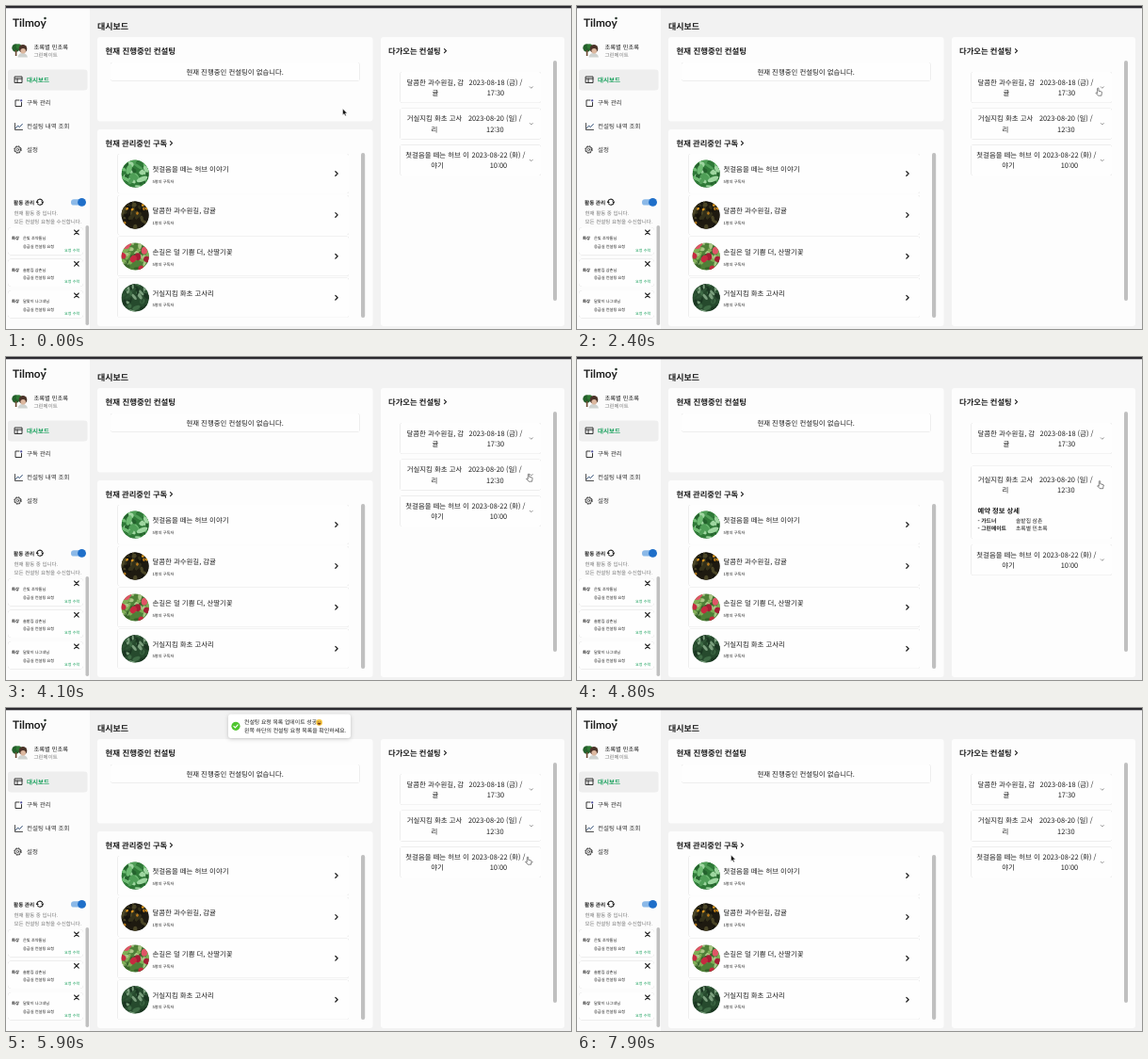
An HTML page that plays this animation: 600x343 px, repeating every 8 s.

```html
<!DOCTYPE html>
<html lang="ko">
<head>
<meta charset="utf-8">
<title>대시보드</title>
<style>
  html, body { margin: 0; width: 100%; height: 100%; overflow: hidden; background: #f2f2f2; }
  svg { display: block; font-family: "Noto Sans CJK KR", "Noto Sans KR", "Noto Sans CJK JP", "Noto Sans CJK", sans-serif; }
  #stage { width: 100vw; height: 100vh; text-rendering: geometricPrecision; }
  .card { fill: #fefefe; filter: drop-shadow(0 .9px .45px rgba(0, 0, 0, .24)); }
  .panel { fill: #fdfdfd; }
  .line { fill: none; stroke: #222; stroke-linecap: round; stroke-linejoin: round; }
  .bar { fill: #c0c0c0; }
  #toast .box { fill: #fff; filter: drop-shadow(0 1px 2px rgba(0, 0, 0, .2)); }
</style>
</head>
<body>
<svg id="stage" viewBox="0 0 600 343"></svg>
<script>
const LOOP = 8000;
const USER = '초록별 민초록';
const stage = document.getElementById('stage');

// ---------- drawing helpers ----------
// y is the optical middle of the line
function text(x, y, size, str, { fill = '#1c1c1c', weight = 500, anchor = 'start', extra = '' } = {}) {
  return `<text x="${x}" y="${(y + size * 0.37).toFixed(2)}" font-size="${size}" font-weight="${weight}"
    fill="${fill}" text-anchor="${anchor}" ${extra}>${str}</text>`;
}
const rect = (x, y, w, h, r, attrs) => `<rect x="${x}" y="${y}" width="${w}" height="${h}" rx="${r}" ${attrs}/>`;
const line = (d, width = 0.9, attrs = '') => `<path class="line" d="${d}" stroke-width="${width}" ${attrs}/>`;
const dot = (x, y, r, fill) => `<circle cx="${x}" cy="${y}" r="${r}" fill="${fill}"/>`;
const ring = (x, y, r, width, attrs = '') => `<circle class="line" cx="${x}" cy="${y}" r="${r}" stroke-width="${width}" ${attrs}/>`;
const chevron = (x, y, s = 2, w = 1.2) => line(`M${x - s / 2} ${y - s}l${s} ${s}l${-s} ${s}`, w);

function random(seed) {
  return () => (seed = (seed * 16807) % 2147483647) / 2147483647;
}

// Round picture made of scattered leaves and fruit
function photo(i, cx, cy, { base, leaves, leaf = 3, fruit, count = 0, size = 2 }) {
  const rnd = random(977 + i * 631);
  const spot = (fill, rx, ry) => {
    const x = cx + (rnd() - 0.5) * 29, y = cy + (rnd() - 0.5) * 29;
    return `<ellipse cx="${x}" cy="${y}" rx="${rx}" ry="${ry}" fill="${fill}" transform="rotate(${rnd() * 180} ${x} ${y})"/>`;
  };
  let out = dot(cx, cy, 15, base);
  for (let n = 0; n < 34; n++) out += spot(leaves[n % leaves.length], leaf * (0.6 + rnd()), leaf * (0.3 + rnd() * 0.5));
  for (let n = 0; n < count; n++) out += spot(fruit[n % fruit.length], size, size * 0.8);
  return `<clipPath id="pic${i}"><circle cx="${cx}" cy="${cy}" r="14.6"/></clipPath><g clip-path="url(#pic${i})">${out}</g>`;
}

// ---------- static parts ----------
function sidebar() {
  const notes = ['은빛 조약돌님', '솔밭집 삼촌님', '달맞이 나그네님'];
  const green = '#18a05c';
  const menu = [['대시보드', 78.5], ['구독 관리', 103], ['컨설팅 내역 조회', 128], ['설정', 152.5]];
  const grey = { fill: '#777', weight: 400 };
  let out = rect(0, 0, 89, 343, 0, 'fill="#fcfcfc"') + rect(2, 67.5, 84.5, 22, 3, 'fill="#eeeeee"');
  out += text(7, 17.5, 11.8, 'Tilmoy', { weight: 700, fill: '#1d1d1d', extra: 'style="font-family:Lato,sans-serif"' });
  out += dot(41.5, 13, 1.3, '#26352b');

  // avatar
  out += dot(10.5, 44.5, 4.2, '#24602b') + dot(13.5, 43, 2.8, '#2f7a35') + rect(9.8, 47, 1.6, 6, 0, 'fill="#6b4630"');
  out += '<path d="M12.5 54.5q.4-4.5 5-4.5t5.5 4.5z" fill="#cfd3d0"/>' + dot(18, 45.4, 4.3, '#4a3328') + dot(18.2, 47.8, 2.8, '#dcb8a0');
  out += text(29.5, 43.5, 6.3, USER) + text(29.5, 52, 5.5, '그린메이트', grey);

  menu.forEach(([label, y], i) => {
    out += text(22, y, 6.5, label, i ? { fill: '#333' } : { fill: green, weight: 700 });
  });
  out += line('M9.5 75h7.5v6.5h-7.5zM9.5 77.2h7.5M12 77.2v4.3', 0.9);
  out += line('M14 100h-4v6.5h6.5v-4', 0.9) + dot(16.2, 100.4, 1.1, '#4b4b9a');
  out += line('M9.5 124.5v7h8', 0.8) + line('M10.5 129.5l2.2-2.3 1.6 1.4 3-3.2', 1, 'style="stroke:#2b4a73"');
  out += ring(12.5, 152.5, 3.7, 1, 'style="stroke-linecap:butt" stroke-dasharray="1.6 1.306"') +
    ring(12.5, 152.5, 3.1, 0.7) + ring(12.5, 152.5, 1.2, 0.7);

  out += text(8, 208.5, 5.6, '활동 관리', { weight: 700 });
  out += line('M32.8 207.8a3.2 3.2 0 0 1 5.8-1.2M39.2 208.6a3.2 3.2 0 0 1-5.8 1.2', 1.1);
  out += '<path d="M37 207.4h3.4l-1.7 2zM31.6 208.9h3.4l-1.7-2z" fill="#222"/>';
  out += rect(69, 205.2, 15.5, 6.4, 3.2, 'fill="#8bb9e8"') + dot(80.5, 208.4, 4.4, '#1f6fc9');
  out += text(8.5, 220, 5.5, '현재 활동 중 입니다.', grey);
  out += text(8.5, 228.7, 5.5, '모든 컨설팅 요청을 수신합니다.', grey);

  notes.forEach((name, i) => {
    const y = 235 + i * 33.5;
    out += rect(2, y, 80, 29.5, 4, 'class="card"');
    out += line(`M72.6 ${y + 3}l4.6 4.6m0-4.6l-4.6 4.6`, 1.1);
    out += text(6, y + 11.5, 4.3, '화상', { weight: 700 });
    out += text(18, y + 11.5, 4.2, name) + text(18, y + 20.2, 4.2, '응급실 컨설팅 요청');
    out += text(62, y + 24, 4.1, '요청 수락', { fill: green });
  });
  return out + rect(84.5, 233, 3.6, 106, 1.8, 'class="bar"');
}

function panels() {
  const head = { weight: 600 };
  const plans = [
    ['첫걸음을 떼는 허브 이야기', 5, { base: '#2f7a38', leaf: 4, leaves: ['#4f9f57', '#9ed6a0', '#24632d', '#6dbb72'] }],
    ['달콤한 과수원길, 감귤', 1, { base: '#1e1a10', leaves: ['#34311a', '#15130c', '#4a4526'], fruit: ['#d9951f', '#b97a1a'], count: 9, size: 1.6 }],
    ['손길은 덜 기쁨 더, 산딸기꽃', 5, { base: '#4f8038', leaves: ['#7fae55', '#3a662b', '#a9c684'], fruit: ['#c62a40', '#df5566', '#a51d35'], count: 8, size: 4 }],
    ['거실지킴 화초 고사리', 5, { base: '#264a2d', leaves: ['#3f6c46', '#1a3621', '#7a9f7d', '#2e5435'] }]
  ];
  let out = rect(97, 33, 292.5, 89.5, 3, 'class="panel"') + rect(97, 131, 292.5, 209, 3, 'class="panel"') +
    rect(398, 33, 195, 307, 3, 'class="panel"');
  out += text(97, 22, 9, '대시보드', head);
  out += text(105.5, 47.5, 8.45, '현재 진행중인 컨설팅', head);
  out += rect(111, 60, 264.5, 19.5, 2, 'class="card"');
  out += text(243.2, 70, 7.4, '현재 진행중인 컨설팅이 없습니다.', { anchor: 'middle' });
  out += text(105.5, 145.5, 8.3, '현재 관리중인 구독', head) + chevron(175.5, 145.6);
  out += text(406, 47.5, 8.3, '다가오는 컨설팅', head) + chevron(466.5, 47.7);

  plans.forEach(([name, count, look], i) => {
    const y = 157 + i * 43.9;
    out += rect(118.5, y, 245.5, 42, 2, 'class="card"') + photo(i, 137.2, y + 21.2, look);
    out += text(155.5, y + 16.3, 7.4, name) + text(155.5, y + 29.2, 4.2, `${count}명의 구독자`);
    out += chevron(351, y + 21, 2.3, 1.3);
  });
  out += rect(111, 330.5, 260, 9, 0, 'class="panel"');
  return out + rect(377, 156, 4.2, 175, 2, 'class="bar"') + rect(581, 58, 4, 255, 2, 'class="bar"');
}

// ---------- moving parts ----------
const ROW = 32.7, GAP = 6, GROW = 7.4, DETAIL = 37.2;
const visits = [
  { title: ['달콤한 과수원길, 감', '귤'], date: '2023-08-18 (금) /', time: '17:30', who: '햇살 텃밭꾼', cx: [455.8, 520], open: 2560, close: 3341 },
  { title: ['거실지킴 화초 고사', '리'], date: '2023-08-20 (일) /', time: '12:30', who: '솔밭집 삼촌', cx: [455, 519.3], open: 4150, close: 4930 },
  { title: ['첫걸음을 떼는 허브 이', '야기'], date: '2023-08-22 (화) /', time: '10:00', who: '달맞이 나그네', cx: [458, 523], open: 6030, close: 6560 }
];

function visitRow({ title, date, time, who, cx }) {
  const mid = { anchor: 'middle' }, bold = { weight: 700 };
  return `<g class="visit">${rect(418.5, 0, 149.5, ROW, 2, 'class="card"')}
    <g class="summary">
      ${text(cx[0], 11, 7.4, title[0], mid)}${text(cx[0], 22.3, 7.4, title[1], mid)}
      ${text(cx[1], 11, 7.4, date, mid)}${text(cx[1], 22.3, 7.4, time, mid)}
      <g class="arrow">${line('M-1.5-.7L0 .8L1.5-.7', 0.8, 'style="stroke:#777"')}</g>
    </g>
    <svg class="detail" x="418" width="150" height="0">
      ${text(7.5, 7.6, 7.3, '예약 정보 상세', bold)}
      ${text(7.5, 17.6, 5.8, '- 가드너', bold)}${text(48, 17.6, 5.8, who)}
      ${text(7.5, 26.2, 5.8, '- 그린메이트', bold)}${text(48, 26.2, 5.8, USER)}
    </svg></g>`;
}

function toastBox() {
  return `<g id="toast">${rect(236, 6.5, 130, 25.5, 3, 'class="box"')}
    ${dot(244, 19.3, 4.6, '#4fc52f')}${line('M241.9 19.4l1.5 1.5 2.8-3', 1.1, 'style="stroke:#fff"')}
    ${text(253, 15.3, 5.9, '컨설팅 요청 목록 업데이트 성공')}
    ${dot(332.6, 15.4, 3.3, '#f7c53c')}${dot(331.4, 14.4, 0.45, '#5b3a12')}${dot(333.8, 14.4, 0.45, '#5b3a12')}
    <path d="M330.6 15.8h4q-.3 2-2 2t-2-2z" fill="#7a3b1c"/>
    ${text(253, 23.6, 5.95, '왼쪽 하단의 컨설팅 요청 목록을 확인하세요.')}</g>`;
}

const pointers = `<g id="cursor">
  <path id="arrow" d="M0 0V6.8L1.6 5.4 2.6 7.8 3.8 7.3 2.8 4.9H4.8Z" fill="#111" stroke="#fff" stroke-width=".5"/>
  <path id="hand" d="M-.7 4.7V.8a.7.7 0 0 1 1.4 0V3.3l2.5.5q1 .2.9 1.2L3.6 8.2H.2L-2.4 5.4q.5-1 1.7.3Z"
    fill="#fff" stroke="#333" stroke-width=".6" stroke-linejoin="round"/></g>`;

stage.innerHTML = rect(0, 0, 600, 343, 0, 'fill="#f2f2f2"') + sidebar() + panels() +
  visits.map(visitRow).join('') + toastBox() + rect(0, 0, 600, 2.3, 0, 'fill="#2b2a2f"') + pointers;

// ---------- timing ----------
const clamp = v => Math.min(1, Math.max(0, v));

function bezier(x1, y1, x2, y2) {
  const at = (a, b, s) => 3 * a * s * (1 - s) ** 2 + 3 * b * s * s * (1 - s) + s ** 3;
  return x => {
    let lo = 0, hi = 1;
    for (let n = 0; n < 22; n++) {
      const s = (lo + hi) / 2;
      if (at(x1, x2, s) < x) lo = s; else hi = s;
    }
    return at(y1, y2, lo);
  };
}
const standard = bezier(0.4, 0, 0.2, 1);
const enter = bezier(0.21, 1.02, 0.73, 1);
const leave = bezier(0.06, 0.71, 0.55, 1);

const track = [
  [0, 357.5, 109], [250, 357.5, 109], [950, 432.5, 100], [1050, 433, 100], [1750, 547, 88], [2250, 553.3, 87],
  [3550, 553.3, 87], [4000, 555, 124], [4150, 555, 124], [4400, 555, 131.5], [5000, 555, 131.5], [5500, 554, 158],
  [6680, 554, 158], [7180, 162, 163], [7700, 163.5, 156], [LOOP, 163.5, 156]
];
const toasts = [[380, 1780], [4810, 6210]];

const pick = sel => stage.querySelector(sel);
const toast = pick('#toast'), cursor = pick('#cursor'), arrow = pick('#arrow'), hand = pick('#hand');
const rows = [...stage.querySelectorAll('.visit')].map(el => ({
  el, box: el.querySelector('.card'), summary: el.querySelector('.summary'),
  detail: el.querySelector('.detail'), arrow: el.querySelector('.arrow')
}));

function drawVisits(t) {
  let top = 70;
  rows.forEach((row, i) => {
    const { open, close } = visits[i];
    const phase = ms => standard(clamp((t - open) / ms)) - standard(clamp((t - close) / ms));
    const margin = phase(150), reveal = phase(300);
    const head = ROW + GROW * margin, shown = DETAIL * reveal;
    if (i) top += 7 * margin;
    row.el.setAttribute('transform', `translate(0 ${top})`);
    row.box.setAttribute('height', head + shown);
    row.summary.setAttribute('transform', `translate(0 ${GROW / 2 * margin})`);
    row.arrow.setAttribute('transform', `translate(557.8 16.5) rotate(${180 * margin})`);
    row.detail.setAttribute('y', head);
    row.detail.setAttribute('height', shown);
    row.detail.style.visibility = shown > 0.01 ? 'visible' : 'hidden';
    top += head + shown + GAP;
  });
}

function drawToast(t) {
  const span = toasts.find(([from, to]) => t >= from && t < to + 400);
  toast.style.display = span ? '' : 'none';
  if (!span) return;
  const inn = enter(clamp((t - span[0]) / 350)), out = leave(clamp((t - span[1]) / 400));
  const shift = -25.5 * (2 * (1 - inn) + 1.5 * out);
  const scale = 1 - 0.4 * (1 - inn) - 0.4 * out;
  toast.setAttribute('transform', `translate(301 ${19.25 + shift}) scale(${scale}) translate(-301 -19.25)`);
  toast.setAttribute('opacity', (0.5 + 0.5 * inn) * (1 - out));
}

function drawCursor(t) {
  const k = Math.max(1, track.findIndex(p => p[0] > t));
  const [t0, x0, y0] = track[k - 1], [t1, x1, y1] = track[k];
  let p = (t - t0) / (t1 - t0);
  p = p * p * (3 - 2 * p);
  const x = x0 + (x1 - x0) * p, y = y0 + (y1 - y0) * p;
  const over = x > 418.5 && x < 568 && y > 70;
  cursor.setAttribute('transform', `translate(${x} ${y})`);
  arrow.style.display = over ? 'none' : '';
  hand.style.display = over ? '' : 'none';
}

function draw(t) {
  drawVisits(t);
  drawToast(t);
  drawCursor(t);
}

const start = performance.now();
function tick() {
  draw((performance.now() - start) % LOOP);
  requestAnimationFrame(tick);
}
tick();
</script>
</body>
</html>
```
